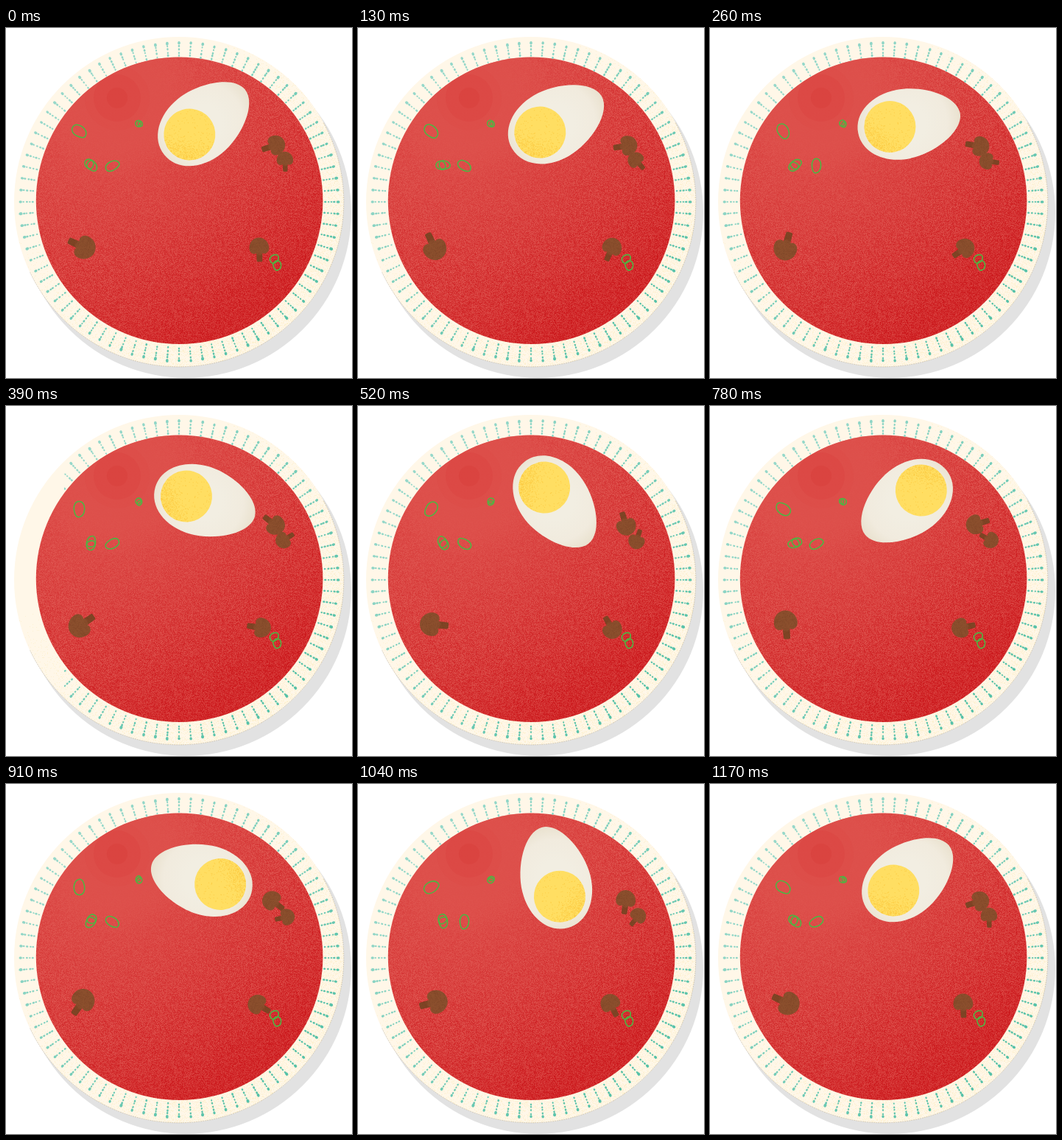
An HTML page with a canvas for the animation above (1300 ms loop, 470 px wide and 475 px high).

```html
<!DOCTYPE html>
<html lang="en">
<head>
<meta charset="utf-8">
<title>Soup bowl</title>
<style>
html, body { margin: 0; width: 100%; height: 100%; overflow: hidden; background: #fff; }
canvas { display: block; width: 470px; height: 475px; }
</style>
</head>
<body>
<canvas id="stage" width="470" height="475"></canvas>
<script>
const W = 470, H = 475, STEP = 130, COUNT = 10, BLINK = 3, TAU = Math.PI * 2;
const ctx = document.getElementById('stage').getContext('2d');

const clamp = (v, a, b) => Math.max(a, Math.min(b, v));
const mix = (a, b, k) => a.map((v, i) => v + (b[i] - v) * k);

// Easings of one full turn
const linear = p => p;
const late = p => p ** 1.7;
const smooth = p => p - 0.4 * Math.sin(TAU * p) / TAU;

function seeded(seed) {
  return () => {
    seed = (seed + 0x6D2B79F5) | 0;
    let t = Math.imul(seed ^ (seed >>> 15), 1 | seed);
    t = (t + Math.imul(t ^ (t >>> 7), 61 | t)) ^ t;
    return ((t ^ (t >>> 14)) >>> 0) / 4294967296;
  };
}

function layer(w, h, draw) {
  const c = document.createElement('canvas');
  c.width = w;
  c.height = h;
  draw(c.getContext('2d'));
  return c;
}

function circle(g, x, y, r) {
  g.beginPath();
  g.arc(x, y, r, 0, TAU);
}

function disc(g, x, y, r, fill) {
  circle(g, x, y, r);
  g.fillStyle = fill;
  g.fill();
}

// Paints a layer pixel by pixel; shade returns [r, g, b, a].
function grain(w, h, seed, shade) {
  return layer(w, h, g => {
    const img = g.createImageData(w, h), rnd = seeded(seed);
    for (let y = 0, i = 0; y < h; y++)
      for (let x = 0; x < w; x++, i += 4) img.data.set(shade(x, y, rnd()), i);
    g.putImageData(img, 0, 0);
  });
}

const soupGrain = grain(W, H, 7, (x, y, n) => {
  const k = clamp((Math.hypot(x - 151, y - 95) - 45) / 290, 0, 1);
  const slope = clamp((x * 0.7 + y - 180) / 430, 0, 1);
  const dark = 0.08 + 0.27 * k + 0.36 * slope * slope;
  const spread = 0.1 + 0.65 * Math.min(1, k * 1.5);
  return [...mix([223, 84, 79], [203, 24, 28], clamp(dark + (n - 0.5) * spread, 0, 1)), 255];
});

const rimGrain = grain(W, H, 21, (x, y, n) =>
  [250, 229, 172, n < clamp((x + y - 300) / 1400, 0, 0.3) ? 90 : 0]);

const brownGrain = grain(48, 48, 5, (x, y, n) => [92, 43, 20, n < 0.3 ? 50 : 0]);

const yolkGrain = grain(72, 72, 13, (x, y, n) => {
  const side = ((x - 36) * Math.cos(2.45) + (y - 36) * Math.sin(2.45)) / 35;
  return [247, 181, 28, n < clamp(side * 0.5, 0.03, 0.6) ? 110 : 0];
});

const plate = layer(W, H, g => {
  g.fillStyle = '#fff';
  g.fillRect(0, 0, W, H);
  disc(g, 244.5, 250.3, 224.5, '#e2e2e2');
  disc(g, 235, 236, 224, '#fff7e8');
  g.save();
  g.clip();
  g.drawImage(rimGrain, 0, 0);
  g.restore();

  g.beginPath();
  g.arc(235, 236, 223.8, -0.5, 2.7);
  g.strokeStyle = 'rgba(90,80,65,.4)';
  g.lineWidth = 0.6;
  g.setLineDash([2, 1]);
  g.stroke();

  circle(g, 235.6, 234.3, 194.8);
  g.clip();
  g.drawImage(soupGrain, 0, 0);
  const glow = g.createRadialGradient(151, 95, 0, 151, 95, 110);
  glow.addColorStop(0, 'rgba(221,80,75,.95)');
  glow.addColorStop(0.5, 'rgba(221,80,75,.8)');
  glow.addColorStop(1, 'rgba(223,84,78,0)');
  disc(g, 151, 95, 110, glow);
  disc(g, 151, 95, 44, 'rgba(214,62,58,.1)');
  disc(g, 151, 95, 32, 'rgba(212,58,54,.22)');
  disc(g, 151, 95, 14, 'rgba(210,54,50,.28)');
});

const dots = layer(W, H, g => {
  const rnd = seeded(31), lines = 84, perLine = 5;
  for (let i = 0; i < lines; i++) {
    const a = i / lines * TAU;
    const shade = clamp((Math.sin(a) + Math.cos(a) + 1.4) / 2.8, 0, 1);
    g.fillStyle = `rgb(${mix([151, 216, 202], [85, 193, 168], shade)})`;
    for (let j = 0; j < perLine; j++) {
      const r = 198.5 + j * 4.3 + (rnd() - 0.5) * 1.4;
      const size = 0.95 + (j === perLine - 1 ? 0.8 : 0.1) + rnd() * 0.5;
      g.beginPath();
      g.ellipse(235 + r * Math.cos(a), 236 + r * Math.sin(a), size * 1.15, size * 0.9, a, 0, TAU);
      g.fill();
    }
  }
});

function at(x, y, deg, scale, draw) {
  ctx.save();
  ctx.translate(x, y);
  ctx.rotate(deg * Math.PI / 180);
  ctx.scale(scale, scale);
  draw();
  ctx.restore();
}

// The egg turns about its middle, with the yolk off to the blunt side.
const eggShape = new Path2D(
  'M-68 0C-68 -28 -40 -47.5 -6 -47.5C29 -47.5 73 -25 73 0C73 25 29 47.5 -6 47.5C-40 47.5 -68 28 -68 0Z');

function drawEgg(p) {
  at(268, 129.4, -39 + 360 * late(p), 1, () => {
    const g = ctx.createRadialGradient(0, 0, 25, 0, 0, 74);
    g.addColorStop(0, '#f2eee2');
    g.addColorStop(0.6, '#f1ebde');
    g.addColorStop(1, '#e9e1ce');
    ctx.fillStyle = g;
    ctx.fill(eggShape);
    disc(ctx, -24, 0, 35, '#ffde62');
    ctx.clip();
    ctx.drawImage(yolkGrain, -60, -36);
  });
}

const cap = new Path2D(
  'M-16 -2C-16 -13 -8 -19 0 -19C8 -19 16 -12 16 -2C16 5 10 9 5 6C3 10 -3 10 -5 6C-10 9 -16 5 -16 -2Z');
const stem = new Path2D('M-5 2L5 2L4.5 17Q5 20 2 20L-2 20Q-5 20 -4.5 17Z');
const mushroom = new Path2D(cap);
mushroom.addPath(stem);

const mushrooms = [
  { x: 103, y: 296.5, size: 1, from: 115, turn: 360, ease: linear },
  { x: 363.5, y: 160, size: 0.84, from: 72, turn: 360, ease: late },
  { x: 379, y: 181, size: 0.7, from: -2, turn: -360, ease: linear },
  { x: 344, y: 300.5, size: 0.84, from: -2, turn: 360, ease: smooth }
];

function drawMushroom() {
  ctx.fillStyle = '#7f4525';
  ctx.fill(stem);
  ctx.fillStyle = '#8b4f2d';
  ctx.fill(cap);
  ctx.clip(mushroom);
  ctx.drawImage(brownGrain, -24, -24);
}

// Each onion piece is one or two rings given as [x, rx, ry].
const onions = [
  { x: 99.5, y: 140, from: 25, turn: 360, ease: late, rings: [[0, 10.5, 7.2]] },
  { x: 115.5, y: 186, from: 32, turn: -360, ease: linear, rings: [[0, 9.5, 6], [-1, 4.2, 5.5]] },
  { x: 144.5, y: 187, from: -35, turn: 540, ease: linear, rings: [[0, 9.7, 6]] },
  { x: 180.5, y: 129.8, from: 0, turn: 360, ease: late, rings: [[0, 4.8, 4.2], [0.6, 1.7, 3]] },
  { x: 366.5, y: 318, from: 66, turn: 0, ease: linear, rings: [[-5, 5.3, 6.2], [4.6, 6.3, 5.3]] }
];

function drawRing(x, rx, ry) {
  ctx.beginPath();
  ctx.moveTo(x - rx, 0);
  ctx.bezierCurveTo(x - rx, -ry, x - rx * 0.35, -ry * 1.1, x + rx * 0.1, -ry);
  ctx.bezierCurveTo(x + rx * 0.7, -ry * 0.8, x + rx, -ry * 0.3, x + rx, ry * 0.3);
  ctx.bezierCurveTo(x + rx, ry, x + rx * 0.3, ry, x, ry);
  ctx.bezierCurveTo(x - rx * 0.6, ry, x - rx, ry * 0.5, x - rx, 0);
  ctx.stroke();
}

function drawOnion(rings) {
  ctx.strokeStyle = '#4fb443';
  ctx.lineWidth = 1.6;
  for (const r of rings) drawRing(...r);
}

function draw(step) {
  const p = step / (COUNT - 1);
  // the left part of the rim pattern blinks off for one step
  const left = step === BLINK ? 79 : 0;
  ctx.drawImage(plate, 0, 0);
  ctx.drawImage(dots, left, 0, W - left, H, left, 0, W - left, H);
  drawEgg(p);
  for (const m of mushrooms)
    at(m.x, m.y, m.from + m.turn * m.ease(p), m.size, drawMushroom);
  for (const o of onions)
    at(o.x, o.y, o.from + o.turn * o.ease(p), 1, () => drawOnion(o.rings));
}

let shown = -1;
const start = performance.now();
function tick() {
  const t = Math.max(0, performance.now() - start);
  const step = Math.floor(t / STEP) % COUNT;
  if (step !== shown) draw(shown = step);
  requestAnimationFrame(tick);
}
tick();
</script>
</body>
</html>
```
